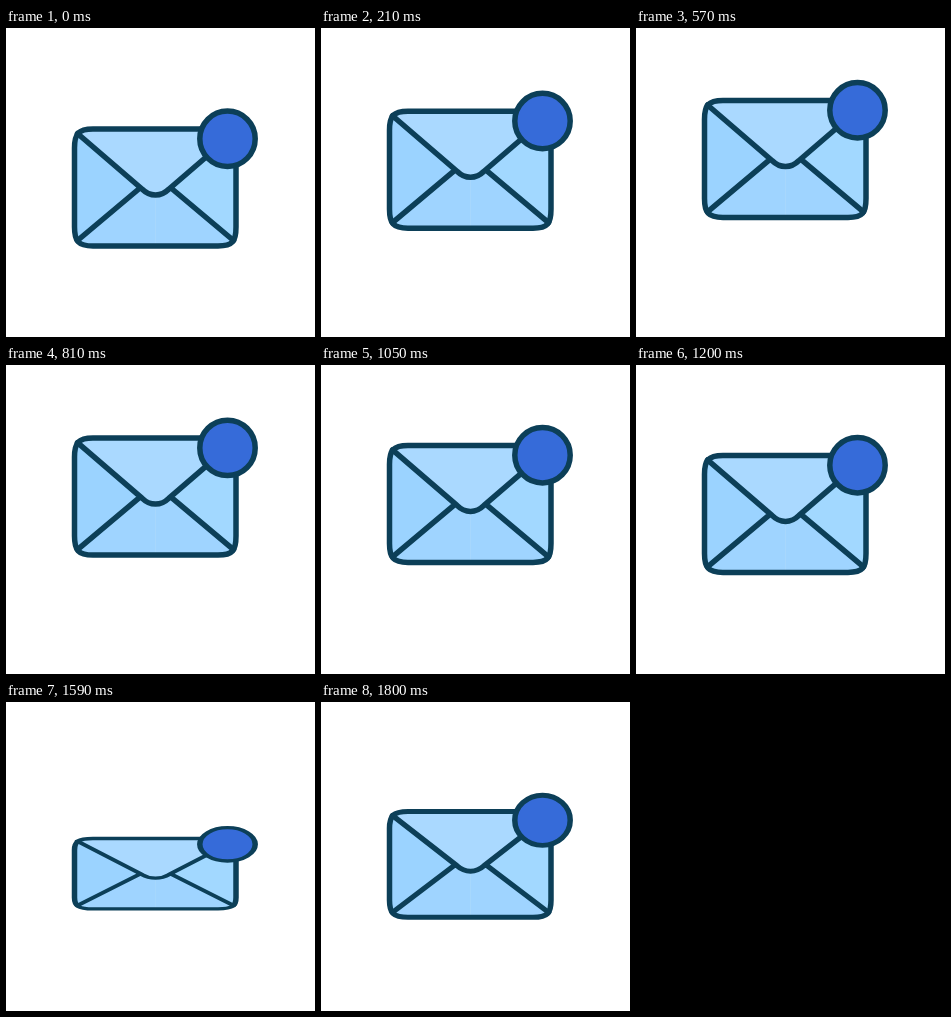
Write an HTML page that moves like this. It is 309 px wide and 309 px high and loops after 1830 ms.

```html
<!DOCTYPE html>
<html lang="en">
<head>
<meta charset="utf-8">
<title>New mail</title>
<style>
  html, body { margin: 0; width: 100%; height: 100%; overflow: hidden; background: #fff; }
  svg { display: block; width: 100%; height: 100%; }
  .line { fill: none; stroke: #0c3f58; stroke-width: 5.5; stroke-linecap: round; stroke-linejoin: round; }
</style>
</head>
<body>
<svg viewBox="0 0 309 309">
  <defs>
    <path id="body" d="M68.5 120C68.5 106 72 101 87 101H212C227 101 230 106 230 120V199C230 213 227 218 212 218H87C72 218 68.5 213 68.5 199Z"/>
    <clipPath id="inside"><use href="#body"/></clipPath>
  </defs>
  <g id="mail">
    <g clip-path="url(#inside)">
      <path fill="#9bd3ff" d="M60 95H149.5V225H60Z"/>
      <path fill="#a2d8ff" d="M149.5 95H240V225H149.5Z"/>
      <path fill="#9fd4ff" d="M60 222L149.5 147L239 222Z"/>
      <path fill="#aad9ff" d="M60 95H239L163 161C155 169 144 169 136 161Z"/>
      <path stroke="#abd9fc" stroke-width=".7" d="M149.5 168V217"/>
    </g>
    <path class="line" d="M71.5 105.5L136 161C144 169 155 169 163 161L227.5 105.5M71.5 212.5L134 160M227.5 212.5L165 160"/>
    <use class="line" href="#body"/>
    <circle class="line" cx="221.5" cy="110.8" r="27.7" style="fill:#366bd9"/>
  </g>
</svg>
<script>
  const LOOP = 1830, STEP = 30;
  const LAND = 1310;            // end of the hop, start of the squash
  const LIFT = 28.7, SQUASH = 0.4, PIVOT = 190;
  const mail = document.getElementById('mail');

  // 0 at both ends of the span, 1 in the middle
  const arc = (t, start, end, power) => {
    const half = (end - start) / 2;
    return 1 - Math.abs((t - start - half) / half) ** power;
  };

  function draw() {
    const t = Math.floor(performance.now() % LOOP / STEP) * STEP;
    const y = t < LAND ? -LIFT * arc(t, 0, LAND, 2.5) : 0;
    const scale = t < LAND ? 1 : 1 - SQUASH * arc(t, LAND, LOOP, 2.2);
    mail.setAttribute('transform', `translate(0 ${y + PIVOT * (1 - scale)}) scale(1 ${scale})`);
    requestAnimationFrame(draw);
  }
  draw();
</script>
</body>
</html>
```
